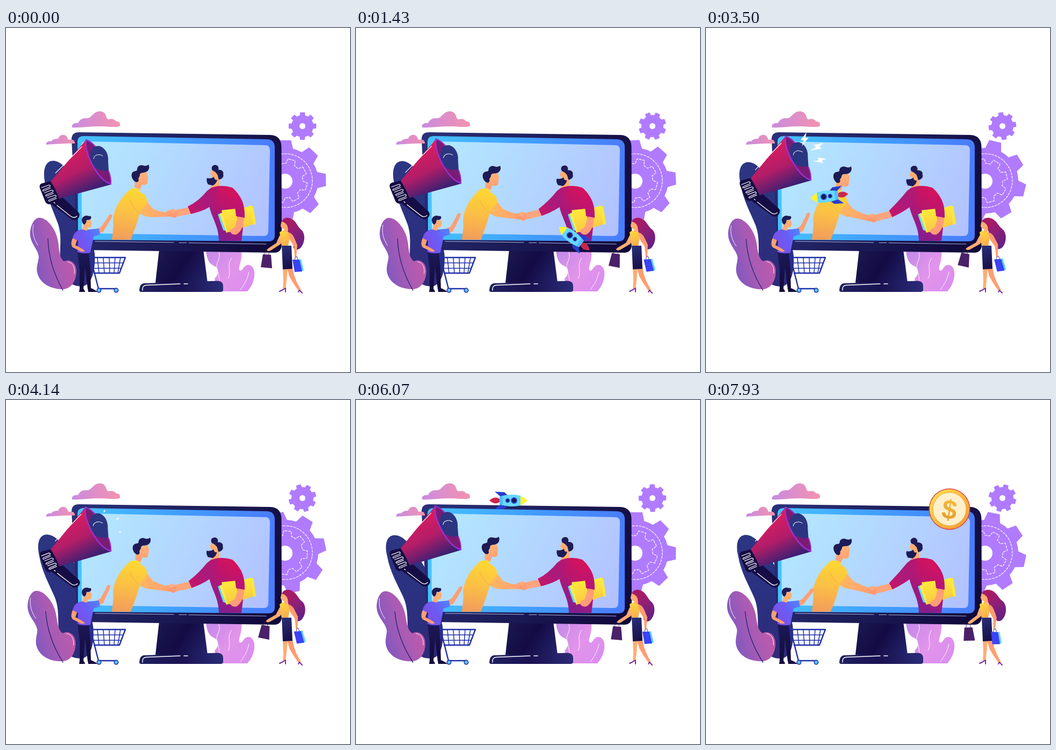
These frames come from a looping animation (640x640 px, 8000 ms). An HTML page with a canvas:

```html
<!DOCTYPE html>
<html lang="en">
<head>
<meta charset="utf-8">
<title>Online partnership</title>
<style>
html, body { margin: 0; width: 100%; height: 100%; overflow: hidden; background: #fff; }
canvas { display: block; width: 100vmin; height: 100vmin; }
</style>
</head>
<body>
<canvas id="stage"></canvas>
<script>
const LOOP = 8, TAU = Math.PI * 2, RAD = Math.PI / 180;
const canvas = document.getElementById('stage');
const c = canvas.getContext('2d');
const ratio = Math.max(1, window.devicePixelRatio || 1);
canvas.width = canvas.height = 640 * ratio;

const NAVY = '#1d1b57', SKIN = '#ffad72';

function grad(x0, y0, x1, y1, ...colors) {
  const g = c.createLinearGradient(x0, y0, x1, y1);
  colors.forEach((col, i) => g.addColorStop(i / (colors.length - 1), col));
  return g;
}
function fill(d, style) {
  c.fillStyle = style;
  c.fill(new Path2D(d));
}
function line(d, style, width = 1) {
  c.strokeStyle = style;
  c.lineWidth = width;
  c.stroke(new Path2D(d));
}
function disc(x, y, r, style, ry = r, rot = 0) {
  c.beginPath();
  c.ellipse(x, y, r, ry, rot, 0, TAU);
  c.fillStyle = style;
  c.fill();
}
function group(draw, x, y, deg = 0, dx = 0, dy = 0) {
  c.save();
  c.translate(x + dx, y + dy);
  c.rotate(deg * RAD);
  c.translate(-x, -y);
  draw();
  c.restore();
}
const clamp = v => Math.max(0, Math.min(1, v));
const wave = (t, period) => (1 - Math.cos(TAU * t / period)) / 2;

// Smooth curve through timed rows [t, ...values]
function track(keys, t) {
  if (t < keys[0][0] || t > keys[keys.length - 1][0]) return null;
  let i = 0;
  while (i < keys.length - 2 && t > keys[i + 1][0]) i++;
  const a = keys[i], b = keys[i + 1], p = keys[i - 1] || a, n = keys[i + 2] || b;
  const h = b[0] - a[0], u = (t - a[0]) / h, u2 = u * u, u3 = u2 * u;
  return a.slice(1).map((v, j) => {
    j++;
    const m0 = (b[j] - p[j]) / (b[0] - p[0]) * h;
    const m1 = (n[j] - a[j]) / (n[0] - a[0]) * h;
    return (2 * u3 - 3 * u2 + 1) * v + (u3 - 2 * u2 + u) * m0 +
      (3 * u2 - 2 * u3) * b[j] + (u3 - u2) * m1;
  });
}

function gearPath(x, y, teeth, outer, inner, turn, tip, root) {
  const path = new Path2D();
  for (let i = 0; i < teeth; i++) {
    const a = turn + i * TAU / teeth;
    [[-root, inner], [-tip, outer], [tip, outer], [root, inner]].forEach(([o, r]) =>
      path.lineTo(x + Math.cos(a + o) * r, y + Math.sin(a + o) * r));
    path.arc(x, y, inner, a + root, a + TAU / teeth - root);
  }
  path.closePath();
  return path;
}

function gears(t) {
  const big = (30 * t - 1) * RAD, small = -15 * t * RAD;
  c.fillStyle = '#b07bff';
  c.fill(gearPath(520, 284, 8, 76, 61, big, 0.15, 0.25));
  c.fill(gearPath(551.5, 182.5, 8, 26, 20.5, small, 0.17, 0.25));
  disc(551.5, 182.5, 5.5, '#fff');
  disc(519, 285, 14, '#fff');
  c.strokeStyle = '#fff';
  c.lineWidth = 1.2;
  c.setLineDash([4, 2.5]);
  c.stroke(gearPath(520, 284, 8, 41, 32, big + 0.3, 0.17, 0.26));
  c.beginPath();
  c.arc(520, 284, 50, big, big + TAU);
  c.stroke();
  c.setLineDash([]);
}

function clouds() {
  fill('M123 185C121 179 128 176 134 177C137 170 144 167 151 168C157 167 158 164 162 161C168 153 181 153 185 161C187 165 187 168 190 170C197 168 203 170 205 174C210 173 213 177 212 182C207 186 190 183 172 183C155 183 140 186 123 185Z',
    grad(123, 0, 212, 0, '#c98be0', '#f492ae'));
  fill('M75 217C74 212 79 210 84 211C88 206 93 206 97 206C99 198 110 196 114 203C115 206 116 208 118 208C124 206 129 210 128 215C112 214 95 216 75 217Z',
    grad(75, 0, 128, 0, '#c98be0', '#f492ae'));
}

function leaves(t) {
  const k = wave(t, 12.8);
  group(() => fill('M72 285C68 260 75 247 88 247C103 248 112 262 122 275L150 330L165 420C167 450 160 475 145 480C123 484 102 466 101 440C99 410 105 390 97 365C88 340 75 315 72 285Z',
    grad(80, 250, 150, 480, '#2c3682', '#2b3180', '#2e2a78')), 142, 480, -4.2 * k);
  group(() => {
    fill('M63 353C52 352 44 370 45 385C46 402 60 412 61 426C60 436 56 444 58 455C63 476 84 486 106 486C122 485 131 470 131 452C131 436 118 429 108 434C99 428 99 412 97 398C94 376 78 354 63 353Z',
      grad(50, 440, 130, 420, '#7f58c0', '#a95bb4', '#c25aa8'));
    line('M78 392C79 430 90 460 106 488', '#2b2a72', 1.4);
    line('M51 366C48 380 52 393 59 404M115 435C124 436 129 445 127 457', '#fff', 0.9);
  }, 106, 488, -3.5 * k);

  fill('M372 412C373 430 378 439 388 443C397 448 396 460 388 466L394 490H449C462 476 464 458 461 449C457 439 448 438 442 446C437 455 432 452 434 444C437 433 439 427 438 412Z',
    grad(372, 420, 460, 490, '#c58aea', '#e294ea', '#d98df0'));
  line('M396 417C401 432 388 437 393 450C398 464 395 469 401 480M420 428C409 442 421 454 413 466M452 454C449 468 443 478 436 487', '#fff', 0.9);
}

function monitor() {
  fill('M285 412H367L375 474H278Z', grad(280, 416, 372, 474, '#1b1850', '#140b44', '#24236c'));
  fill('M248 488Q249 476 256 475L392 470.500Q404 470 404 480V487Q404 491 399 491H252Q248 491 248 488Z',
    grad(248, 0, 404, 0, '#20205f', '#1a1252', '#2b2c78'));
  line('M254 488Q253 479 261 478.500L324 476M331 476H338', '#fff', 1.4);

  fill('M122 207Q122 194 136 194L492 199Q512 200 512.500 221L513 402Q513 418 499 418L145 413Q133 413 132 400Z',
    grad(122, 200, 513, 410, '#2b3179', '#1c1c58', '#100738'));
  fill('M133 212Q133 201 145 201L486 207Q500 208 500 222V386Q500 397 488 397L145 394Q134 394 134 382Z',
    grad(133, 0, 500, 0, '#46c3ff', '#419fff', '#497cfb'));
  fill('M140 219Q140 211 149 211L482 218Q491 218 491 227L488 378Q488 387 479 387L149 382Q141 382 141 374Z',
    grad(140, 215, 490, 385, '#b2e9ff', '#b3d6ff', '#b2c0ff'));
  line('M166 397L312 399M322 399.500H336M340 399.700L484 402', '#d9dcff', 0.8);
}

function partners(t) {
  const k = wave(t, 5.6);
  const hx = 309 - 1.5 * Math.sin(Math.PI * k), hy = 345 + 10 * k;
  const shirt = grad(230, 298, 215, 394, '#ffd832', '#fbbf46', '#f29c5c');

  // Right partner
  group(() => {
    fill('M384 263L393 266L398 275L397 298L380 298L386 282L380 272Z', SKIN);
    fill('M384 265C380 258 386 254 391 255C396 257 396 261 395 264C401 263 406 268 404 272C406 277 402 281 396 282C394 278 395 273 391 270C389 267 386 266 384 265Z', NAVY);
    fill('M374 279Q381 281 387 277Q388 284 393 282Q392 289 385 293L376 291Q372 285 374 279Z', NAVY);
  }, 398, 298, -3.5 * k, 0, k);
  fill('M380 298Q400 290 421 297C437 310 443 330 444 348L438 396H396C396 370 384 355 379 335L376 316Z',
    grad(436, 305, 388, 372, '#d8125a', '#b8166e', '#8a1d8c'));
  fill(`M${hx + 2} ${hy - 5}Q325 ${hy - 9} ${338 + 3 * k} ${334 + 8 * k}L${344 + 3 * k} ${346 + 7 * k}Q326 ${hy + 4} ${hx + 3} ${hy + 7}Z`, '#ffa57c');
  fill(`M396 294Q380 297 374 303Q358 323 ${338 + 3 * k} ${332 + 9 * k}L${344 + 3 * k} ${346 + 7 * k}Q374 339 388 326Z`,
    grad(396, 300, 342, 340, '#b8166e', '#a91a7c', '#c5156a'));

  // Folders held under the arm
  fill('M394 347L404 342L418 380L404 376Z', '#63dcff');
  fill('M397 346L424 338L428 374L410 381Z', '#ffe94a');
  fill('M401 339L429 336L433 376L412 380Z', grad(410, 336, 420, 380, '#ffea3a', '#f8c846'));
  fill('M441 335L457 330L463 364L440 372Z', grad(440, 332, 450, 372, '#fff03a', '#f8c846'));
  fill('M455 333L460 331L465 365L460 366Z', '#ffe73a');
  fill('M432 350L443 350C443 366 438 379 429 384C422 386 416 381 417 376L426 370Z', '#ff9d78');
  fill('M421 299C439 312 445 330 444 353L428 350C427 335 424 327 420 320Z',
    grad(430, 300, 436, 352, '#d8115a', '#b3157c'));

  // Left partner
  fill('M197 394L200 367C196 343 211 318 229 302Q236 295 244 301L258 311Q264 317 261 326L249 344Q242 370 232 394Z', shirt);
  fill(`M244 341Q256 352 270 352L${hx - 5} ${hy + 6}L${hx + 1} ${hy - 5}Q${hx - 10} ${hy - 6} 298 ${343 + 5 * k}Q280 341 273 336L261 321Z`,
    grad(250, 330, 308, 350, '#ffb95c', '#ff9f78'));
  fill('M231 321Q236 335 247 344L263 325Q263 316 255 309L242 309Z', shirt);
  line('M230 320Q236 334 247 343', '#eda34e', 0.8);
  group(() => {
    fill('M245 272L260 265L264 275L263 289Q259 294 253 291L249 301L239 296L240 283Z', grad(245, 270, 255, 300, '#ffb47a', '#ff9d70'));
    fill('M239 285C233 280 232 271 236 268C240 265 244 267 244 263C244 256 251 254 256 256C260 257 263 256 265 254C268 259 266 266 260 268C255 270 250 268 249 273C249 278 245 278 247 283C246 288 241 287 239 285Z', NAVY);
    line('M241 299L248 301', '#ffd832', 3);
  }, 238, 302, 5 * k, 1.5 * k, 1.5 * k);

  disc(hx - 3, hy, 8.5, '#ffa16f', 6, 0.2);
  disc(hx + 3, hy + 1, 6, '#ff9a76', 7.5, -0.4);
  fill(`M${hx - 6} ${hy - 4}Q${hx + 1} ${hy - 11} ${hx + 7} ${hy - 6}L${hx + 2} ${hy}Z`, '#ffac7c');
  line(`M${hx - 7} ${hy + 2}l5 4M${hx - 3} ${hy + 1}l5 4`, '#f08761', 0.8);
}

const inbound = [
  [0.1, 492, 480, 222, 0], [0.45, 476, 462, 222, 1], [1.43, 405, 391, 217, 1],
  [2.71, 314, 290, 209, 1], [3.5, 228, 313, 173, 1], [4.25, 160, 258, 200, 0.2]
];
const outbound = [
  [4.5, 148, 250, -50, 1], [4.86, 164, 230, -50, 1], [5.4, 215, 195, -24, 1],
  [6.07, 285, 187, 0, 1], [6.9, 375, 190, 5, 1], [7.45, 443, 200, 10, 0.7], [7.62, 453, 203, 12, 0]
];

function rocket(t) {
  const pose = track(inbound, t) || track(outbound, t);
  if (!pose) return;
  const [x, y, deg, size] = pose;
  c.save();
  c.translate(x, y);
  c.rotate(deg * RAD);
  c.scale(Math.max(0, size), Math.max(0, size));
  fill('M-18 -3Q-27 -9 -37 0Q-27 9 -18 3Z', '#d8284c');
  c.setLineDash([1, 2]);
  line('M-20 -2H-30M-20 2H-30', '#7b1c64', 1);
  c.setLineDash([]);
  for (const side of [-1, 1]) {
    c.save();
    c.scale(1, side);
    fill('M-27 16.500L-9 15.500L-1 8L-16 7Z', grad(-27, 0, -2, 0, '#2346f0', '#2b34a8'));
    c.restore();
  }
  fill('M21 -9Q4 -13.500 -18 -7.500V7.500Q4 13.500 21 9Z', '#67d8ff');
  fill('M-12 -9L-18 -7.500V7.500L-12 9Z', '#52bdf8');
  fill('M21 -9Q29 -5 34 0Q29 5 21 9Z', '#fff130');
  disc(9, 0, 6, '#2d4be0');
  disc(9, 0, 4.3, NAVY);
  disc(-3, 0, 4.2, '#2d4be0');
  disc(-3, 0, 2.6, NAVY);
  c.restore();
}

function bolts(t) {
  if (t < 3.2 || t > 4.2) return;
  const size = clamp((t - 3.2) / 0.2) * clamp((4.2 - t) / 0.2);
  for (const [x, y, deg, s] of [[183, 207, 0, 1], [207, 221, 42, 1.05], [212, 246, 62, 0.95]]) {
    c.save();
    c.translate(x, y);
    c.rotate(deg * RAD);
    c.scale(s * size, s * size);
    fill('M4 -13L-7 2L-1 2L-5 13L8 -3L2 -3Z', '#fff');
    c.restore();
  }
}

function megaphone(t) {
  const k = wave(t, 12);
  group(() => {
    fill('M82 318L104 314Q120 329 134 342Q139 347 135 353Q130 360 122 356Q101 340 85 328Z', '#160d45');
    line('M89 324L91 326M95 330L120 350Q127 355 132 350', '#fff', 1.3);
    fill('M149 208L196 291L97 318L82 287Z', grad(105, 235, 140, 310, '#d91c60', '#b31d68', '#3c1f72'));
    line('M92 270L141 221', '#fff', 1.1);
    fill('M63 298Q61 291 67 289L83 285Q91 297 99 317L84 327Q77 330 73 323Z', '#150c43');
    for (let i = 0; i < 3; i++) {
      const x = 66 + i * 5.5, y = 299 + i * 9.5;
      line(`M${x} ${y - 2}L${x + 14} ${y - 7}Q${x + 18} ${y - 6} ${x + 15} ${y - 3}L${x + 3} ${y + 2}Q${x + 1} ${y + 5} ${x + 5} ${y + 4}L${x + 17} ${y - 1}`, '#fff', 1.2);
    }
    fill('M149 208Q163 213 177 237Q195 268 196 291Q178 286 161 255Q147 229 149 208Z', '#7a1b74');
    fill('M157 234C158 222 167 218 175 220C186 224 191 236 190 248L191 265C180 267 167 264 160 254Q156 245 157 234Z', '#2c3581');
    line('M149 208Q146 227 161 255Q178 286 195 290', '#9a31cf', 2.6);
    line('M163 243C164 236 173 233 180 238', '#fff', 1);
    line('M149 208Q158 211 166 220M191 266Q196 279 195 290', '#9a31cf', 2);
  }, 130, 290, -1.2 * k, 0, -10.5 * k);
}

function coin(t) {
  const u = clamp((t - 7.2) / 0.5);
  if (!u) return;
  const v = u - 1, size = 1 + 2.2 * v * v * v + 1.2 * v * v;
  c.save();
  c.translate(453, 203);
  c.scale(size, size);
  disc(0, 0, 38.5, '#df3f48');
  disc(0, 0, 37, grad(-30, -30, 30, 30, '#ffe04c', '#fbb93c', '#f2a03c'));
  disc(0, 0, 31.5, '#f3a83a');
  disc(0, 0, 30.5, '#fff0cb');
  c.rotate(8 * RAD);
  c.font = 'bold 50px "Liberation Sans", Arial, sans-serif';
  c.textAlign = 'center';
  c.textBaseline = 'alphabetic';
  c.fillStyle = grad(0, -22, 0, 24, '#f6bd3c', '#e39a2c');
  c.fillText('$', 0, 18);
  c.restore();
}

function shopper(t) {
  const swing = -Math.sin(TAU * t / 12);
  fill('M133 416H154L157 450L158 486H152L147 444L144 486H137L137 450Z', grad(133, 416, 155, 486, '#1c1a58', '#120a3c'));
  fill('M137 485H144Q147 488 147 491H136ZM152 484H158Q166 487 170 491H153Z', '#150a3c');

  // Cart
  line('M144 414L155 418L172 485H206M157 427H222L211 456H164', '#1f2fa8', 2.4);
  line('M159 437H218M161 447H214M170 427L173 456M181 427L183 456M192 427L193 456M203 427L201 456M213 427L208 456', '#1f2fa8', 1.5);
  for (const x of [173, 205]) {
    disc(x, 488, 4.5, '#1f2fa8');
    disc(x, 488, 3, '#58c4f5');
  }

  group(() => {
    fill('M167 374L177 370L189 353Q191 346 196 347L198 348L196 354L181 379L169 384Z', '#ff9f72');
  }, 168, 379, 8 * swing);
  fill('M132 378Q143 372 153 375L173 373L175 384L163 388L157 418Q145 421 133 417L134 396L124 392Q125 383 132 378Z',
    grad(126, 400, 174, 376, '#7c4fe8', '#6a5cf6', '#4f86ff'));
  fill('M124 391L132 395L129 404L142 411L147 415Q141 418 136 414L124 408Q119 402 124 391Z', '#ff9f72');
  fill('M146 360L157 356L160 364L157 371L152 371L151 377L142 375Z', SKIN);
  fill('M143 364Q139 357 143 352Q148 347 154 350Q160 349 158 355Q154 358 150 357L149 362L146 366Z', NAVY);
}

function bag(d, handle, color) {
  line(handle, '#3c1c62', 0.9);
  fill(d, color);
}

function customer(t) {
  const swing = Math.sin(TAU * t / 12), k = wave(t, 5.6);
  group(() => fill('M514 360C515 353 524 351 531 355C541 360 542 370 550 376C558 384 556 402 547 410C540 415 533 412 535 403C536 393 526 388 523 377Z',
    grad(515, 355, 550, 412, '#b81a5e', '#8d1f78', '#5a2186')), 524, 358, -4 * k, k, 0);

  fill('M515 446H524L522 470L520 486L515 488L516 470Z', SKIN);
  fill('M523 446H533L536 460L541 473L549 488L545 490L534 474L527 462Z', '#ff9d70');
  line('M509 490L515 487L520 484V491M544 491L546 488L551 493', '#7a2aa8', 2);

  group(() => {
    group(() => bag('M478 421L493 422L495 447L474 445Z', 'M481 422Q482 414 487 412Q490 415 489 423', '#4a2168'), 487, 413, 3 * swing);
    fill('M509 386L517 392L511 402L494 413Q488 417 485 413L488 410L503 400Z', SKIN);
  }, 513, 388, 4.5 * swing);

  fill('M509 380Q516 374 525 379L528 388L525 407H513L511 394Z', grad(512, 378, 526, 407, '#ffd83a', '#f9a658'));
  fill('M513 405H531L533 448L515 449Z', grad(513, 405, 533, 449, '#29307a', '#150c43'));
  fill('M513 359Q520 357 523 363L525 377L518 380L517 374Q511 373 511 367Z', SKIN);
  fill('M513 360Q517 351 528 355L533 366L525 374Q524 363 513 360Z', '#a51b66');
  group(() => {
    fill('M525 380Q532 381 536 390L542 404L540 426L537 427L536 407L528 394Z', '#ff9d70');
    fill('M542 431L549 430L554 451L548 453Z', '#5cd8fb');
    bag('M533 431L546 431L551 453L537 454Z', 'M537 432Q538 425 541 425Q543 428 543 432', '#3a43f5');
  }, 528, 384, -4 * swing);
}

function frame(now) {
  const t = now / 1000 % LOOP;
  c.setTransform(ratio, 0, 0, ratio, 0, 0);
  c.lineCap = c.lineJoin = 'round';
  c.fillStyle = '#fff';
  c.fillRect(0, 0, 640, 640);
  leaves(t);
  gears(t);
  monitor();
  clouds();
  partners(t);
  rocket(t);
  megaphone(t);
  bolts(t);
  coin(t);
  shopper(t);
  customer(t);
}

const start = performance.now();
(function tick() {
  frame(performance.now() - start);
  requestAnimationFrame(tick);
})();
</script>
</body>
</html>
```
